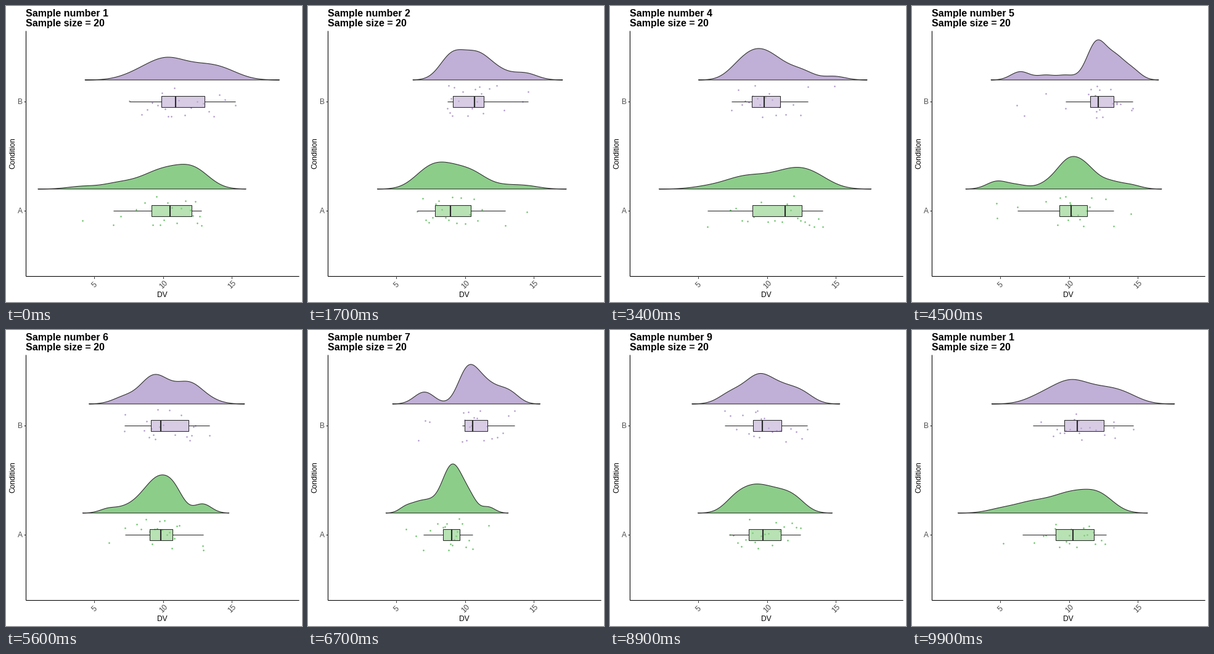
Animation of 480x480 px, one loop 10000 ms. Source, as a matplotlib script:

```python
import numpy as np
import matplotlib.pyplot as plt
from matplotlib.animation import FuncAnimation
from matplotlib.patches import Polygon

plt.rcParams["font.family"] = "Liberation Sans"
PX = 0.75                       # points per pixel at 96 dpi
UNIT = 176.9                    # pixels between the two conditions
MID = {"A": 332.2, "B": 155.3}
CLOUD = {"A": "#8CCD8A", "B": "#C0AFD6"}
BOX = {"A": "#89CF82", "B": "#BEAAD5"}
DOT = {"A": "#6CC46C", "B": "#B09ACD"}
INK = "#2B2B2B"
SIZE = 20                       # observations per group
STARTS = [0, 11, 23, 34, 45, 56, 67, 78, 89, 100]
STEPS = 4                       # frames per transition
rng = np.random.default_rng(12)


def bandwidth(x):
    q1, q3 = np.percentile(x, [25, 75])
    return 0.9 * min(x.std(ddof=1), (q3 - q1) / 1.34) * SIZE ** -0.2


def describe(name, x, box):
    """Jittered points, density curve and box statistics in pixels."""
    x = rng.permutation(x)
    y = MID[name] + rng.uniform(-0.15, 0.15, SIZE) * UNIT
    bw = bandwidth(x)
    grid = np.linspace(x.min() - 3 * bw, x.max() + 3 * bw, 256)
    z = (grid[:, None] - x) / bw
    dens = np.exp(-z ** 2 / 2).sum(axis=1) / bw
    q1, med, q3 = box
    reach = 1.5 * (q3 - q1)
    low = x[x >= q1 - reach].min()
    high = x[x <= q3 + reach].max()
    return x, y, grid, dens, np.array([low, q1, med, q3, high])


def group(name, low, box, high):
    """Values spread evenly between the lowest, the quartiles and the highest."""
    quartiles = np.array([0.25, 0.5, 0.75]) * (SIZE - 1)
    ranks = [*range(len(low)), *quartiles, *range(SIZE - len(high), SIZE)]
    x = np.interp(np.arange(SIZE), ranks, [*low, *box, *high])
    return describe(name, x, box)


def random_group(name, left, right):
    """Normal sample whose density curve spans left to right."""
    x = rng.normal(size=SIZE)
    tail = 3 * bandwidth(x)
    x = np.interp(x, [x.min() - tail, x.max() + tail], [left, right])
    return describe(name, x, np.percentile(x, [25, 50, 75]))


samples = [
    {"A": group("A", [124, 174, 186, 211], (236, 265.5, 300.5), [317]),
     "B": group("B", [199.5, 220], (252, 275, 322), [355, 372])},
    {"A": group("A", [177, 186], (205.5, 230.5, 264), [282, 319.5, 354.5]),
     "B": group("B", [226], (235, 269.5, 285), [317.5, 347.5, 357])},
    {"A": random_group("A", 98, 395),
     "B": random_group("B", 150, 455)},
    {"A": group("A", [158, 194.5], (230.5, 284.3, 310.8), [345]),
     "B": group("B", [196.5, 208], (229.5, 249.5, 276), [321, 364])},
    {"A": random_group("A", 87, 405),
     "B": random_group("B", 128, 400)},
    {"A": group("A", [166.5, 193, 211.5], (232.5, 250.5, 270),
                [280.5, 318.5, 319.5]),
     "B": group("B", [191.5, 192.5, 224], (235, 250.5, 295.5), [307, 330])},
    {"A": group("A", [158.5, 175, 187], (218.5, 233, 245.5), [267, 292.5]),
     "B": group("B", [179, 189.5, 197, 249.5], (253.7, 266.5, 291), [334.5])},
    {"A": group("A", [186], (210.4, 263, 295.5), [321.5]),
     "B": group("B", [140, 168, 186], (226.8, 246, 265.3),
                [283, 308.5, 322.5])},
    {"A": group("A", [194], (224.6, 247.5, 276.5), [309]),
     "B": group("B", [185.5], (232, 247, 278), [320])},
]
PEAK = max(s[name][3].max() for s in samples for name in "AB")

fig = plt.figure(figsize=(5, 5), dpi=96, facecolor="white")
ax = fig.add_axes([0, 0, 1, 1])
ax.set_xlim(0, 480)
ax.set_ylim(480, 0)
ax.axis("off")


def line(xs, ys, color="black", width=1.07, **kw):
    return ax.plot(xs, ys, color=color, lw=width * PX,
                   solid_capstyle="butt", **kw)[0]


def label(x, y, text, size=12, color="black", ha="center", va="center", **kw):
    return ax.text(x, y, text, fontsize=size * PX, color=color,
                   ha=ha, va=va, **kw)


line([32, 32], [40, 438.4])
line([32, 475], [438, 438])
for value in (5, 10, 15):
    x = 31.9 + 22.3 * value
    line([x, x], [439, 442], INK)
    label(x + 0.5, 452.5, str(value), color="#4D4D4D", rotation=45)
for name, y in MID.items():
    line([29, 32], [y, y], INK)
    label(27, y + 4.1, name, color="#4D4D4D", ha="right", va="baseline")
label(253.5, 472.5, "DV", va="baseline")
label(11.4, 238.6, "Condition", rotation=90)
heading = dict(size=16, ha="left", va="baseline", weight="bold")
title = label(32.4, 17.3, "", **heading)
label(32.4, 33.3, f"Sample size = {SIZE}", **heading)


def shape(color, alpha, z):
    fill = Polygon([[0, 0]], fc=color, ec="none", alpha=alpha, zorder=z)
    edge = Polygon([[0, 0]], fc="none", ec=INK, lw=1.07 * PX, zorder=z + 0.1)
    ax.add_patch(fill)
    ax.add_patch(edge)
    return fill, edge


class Raincloud:
    def __init__(self, name):
        self.mid = MID[name]
        self.cloud = shape(CLOUD[name], 1, 3)
        self.dots = line([], [], DOT[name], ls="none", marker="o",
                         ms=2.6 * PX, mew=0, zorder=4)
        self.box = shape(BOX[name], 0.6, 5)
        self.whiskers = [line([], [], INK, zorder=6) for _ in range(2)]
        self.median = line([], [], INK, 2.13, zorder=6)

    def update(self, x, y, grid, dens, stats):
        base = self.mid - 0.2 * UNIT
        top = base - 0.45 * UNIT * dens / PEAK
        outline = np.column_stack([np.r_[grid, grid[-1], grid[0]],
                                   np.r_[top, base, base]])
        low, q1, med, q3, high = stats
        y0, y1 = self.mid - 0.05 * UNIT, self.mid + 0.05 * UNIT
        for part in self.cloud:
            part.set_xy(outline)
        for part in self.box:
            part.set_xy([[q1, y0], [q3, y0], [q3, y1], [q1, y1]])
        self.dots.set_data(x, y)
        self.whiskers[0].set_data([low, q1], [self.mid] * 2)
        self.whiskers[1].set_data([q3, high], [self.mid] * 2)
        self.median.set_data([med, med], [y0, y1])


clouds = {name: Raincloud(name) for name in "AB"}


def draw(frame):
    i = max(k for k, start in enumerate(STARTS) if start <= frame)
    j = (i + 1) % len(samples)
    t = max(0, 1 - (STARTS[i + 1] - frame) / STEPS)
    title.set_text(f"Sample number {(j if t >= 0.5 else i) + 1}")
    for name, cloud in clouds.items():
        pairs = zip(samples[i][name], samples[j][name])
        cloud.update(*[a + (b - a) * t for a, b in pairs])
    return []


anim = FuncAnimation(fig, draw, frames=100, interval=100,
                     init_func=lambda: draw(0), repeat=True, repeat_delay=0)
plt.show()
```
